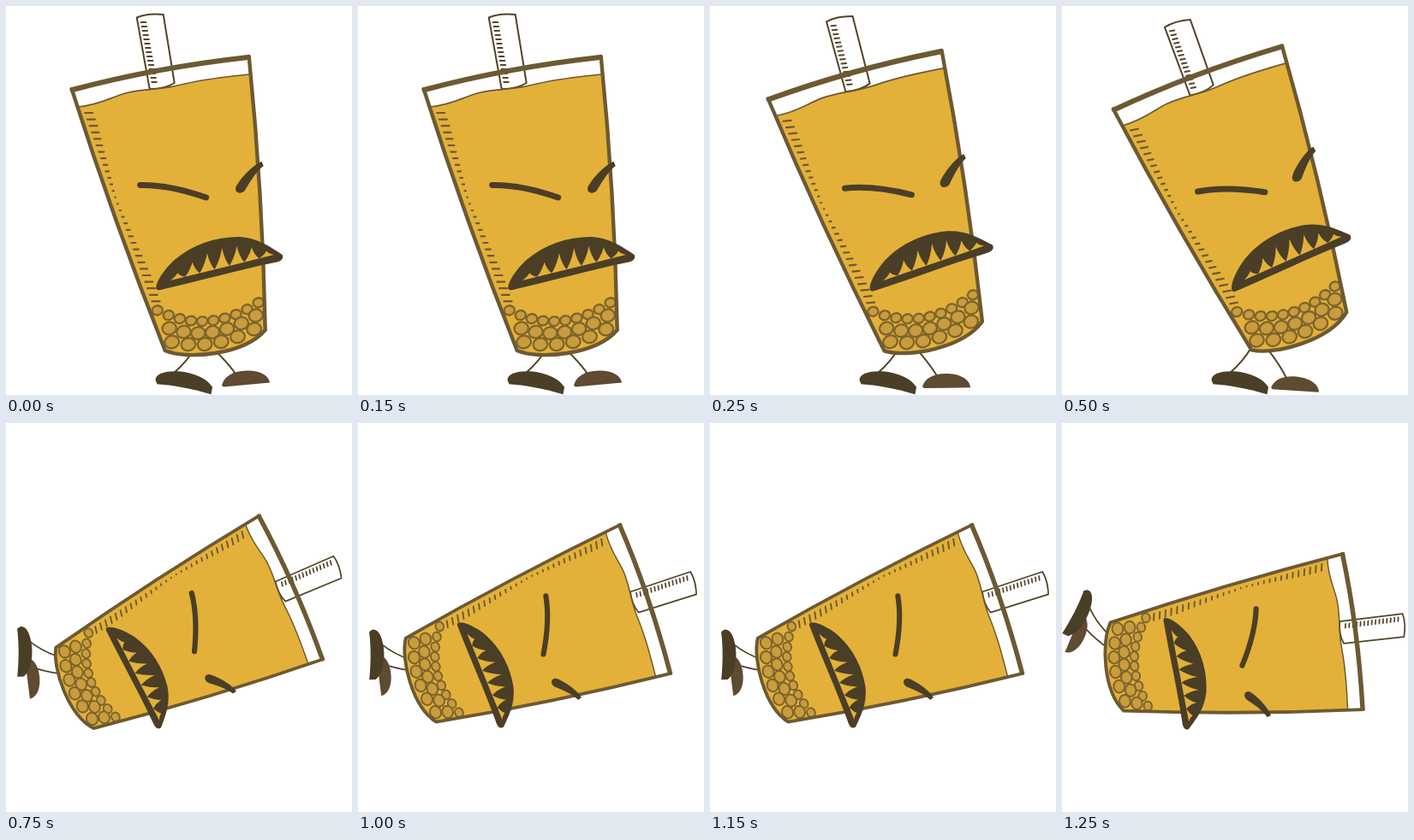
Animation, 404 px wide and 455 px high, one loop 1.5 s. Source, as an HTML page:

```html
<!DOCTYPE html>
<html lang="en">
<head>
<meta charset="utf-8">
<title>Grumpy bubble tea</title>
<style>
  html, body { margin: 0; width: 100%; height: 100%; overflow: hidden; background: #fff; }
  svg { display: block; width: 404px; height: 455px; }
  path { stroke-linecap: round; stroke-linejoin: round; }
  .line { fill: none; stroke: #6d5932; }
  .thin { fill: none; stroke: #54452a; stroke-width: 2; }
  .ink { fill: #4a3e26; }
  .tea { fill: #e3b139; }

  #cup, #near, #far, #farLeg { animation: 1500ms step-end infinite; }
  #cup { animation-name: cup; }
  #near { animation-name: near; }
  #far { animation-name: far; }
  #farLeg { animation-name: swing; }

  /* Upright half: even tilt in three steps. Lying half: held poses. */
  @keyframes cup {
    0%       { translate: 212.2px 234.2px; rotate: 0deg; scale: 1; animation-timing-function: steps(3); }
    49.9990% { translate: 220.2px 230.2px; rotate: -15.3deg; scale: 1; }
    50%      { translate: 207px 251px; rotate: 76.6deg; scale: .873; }
    66.6666% { translate: 205px 253.2px; rotate: 81.7deg; scale: .873; }
    83.3333%, 100% { translate: 202.5px 264.5px; rotate: 93.1deg; scale: .873; }
  }
  @keyframes near {
    0%       { translate: 207.5px 440.7px; rotate: 0deg; scale: 1; }
    50%      { translate: 19.5px 267px; rotate: 79deg; scale: .873; }
    66.6666% { translate: 19.5px 270.5px; }
    83.3333%, 100% { translate: 19.3px 222.3px; rotate: 106deg; scale: .873; }
  }
  @keyframes far {
    0%       { translate: 280px 436px; rotate: 0deg; scale: 1; animation-timing-function: steps(3); }
    49.9990% { translate: 269.5px 446.5px; rotate: 13.5deg; scale: 1; }
    50%      { translate: 31px 298px; rotate: 88deg; scale: .873; }
    66.6666% { translate: 30.3px 294.5px; }
    83.3333%, 100% { translate: 18.5px 248px; rotate: 118deg; scale: .873; }
  }
  @keyframes swing {
    0%        { rotate: 0deg; }
    50%, 100% { rotate: 55deg; }
  }
</style>
</head>
<body>
<svg viewBox="0 0 404 455">
  <g id="far">
    <g transform="translate(-12 -6)"><path id="farLeg" class="thin" d="M0 0 Q-11 -15 -26 -29"/></g>
    <path fill="#5f4a32" d="M-28 8 C-26 -2 -16 -9 1 -9.500 C16 -10 27 -4 28 4.500 C10 6 -8 8 -26 9.500 Z"/>
  </g>
  <g id="near">
    <path class="thin" d="M-11 -12 Q4 -25 14 -42"/>
    <path class="ink" d="M-33 -3 C-33 -11 -22 -14 -7 -13.500 C14 -12 28 -4 33.500 5 L32 13.500 C10 7 -10 3 -31 1.500 Z"/>
  </g>

  <g id="cup">
    <g transform="translate(-212.5 -234.2)">
      <clipPath id="inside"><path d="M77 97 Q126 251 186 403 C212 414 278 408 303 379 Q300 219 284 59 Z"/></clipPath>
      <g clip-path="url(#inside)">
        <path fill="#fff" d="M60 40 H310 V130 H60 Z"/>
        <path class="tea" d="M80 119 C112 115 122 107 140 102 S176 98 196 94 S222 86 290 79 L330 420 H180 Z"/>
      </g>
      <path class="thin" style="fill:#fff" d="M168 97 L153 13.500 Q166 8 184 10 L197 90 C188 96 178 97 168 97"/>
      <path id="strawTicks" class="thin"/>
      <path class="line" stroke-width="1.7" d="M85 118 C112 115 122 107 140 102 S176 98 196 94 S222 86 284 80"/>
      <path id="sideTicks" class="line" stroke-width="2.200"/>
      <g id="pearls" clip-path="url(#inside)" fill="#c99c3d" stroke="#7d642c" stroke-width="2.300"></g>

      <path class="line" stroke-width="4.400" d="M77 97 Q126 251 186 403 C212 414 278 408 303 379 Q300 219 284 59"/>
      <path class="line" stroke-width="6.200" d="M78 98 Q175 72 283 60"/>

      <path class="line" stroke-width="7" style="stroke:#4a3e26" d="M157 209.500 C181 209 211 216 234 224"/>
      <path class="ink" d="M299 182 C291 184 275 200 269 211 C266 217 273 222 279 216 C285 206 292 194 301 187 Z"/>
      <path class="ink" d="M176 331 C174 325 184 309 197 297 C218 279 245 270 272 270 C294 271 308 281 323 291
        C325 296 321 299 314 300 C270 309 225 322 181 332 Q177 333 176 331 Z"/>
      <path id="teeth" class="tea"/>
    </g>
  </g>
</svg>
<script>
  const el = id => document.getElementById(id);
  const range = n => [...Array(n).keys()];
  const setPath = (id, parts) => el(id).setAttribute('d', parts.join(' '));

  setPath('strawTicks', range(15).map(i => `M${158 + i * 0.9} ${19 + i * 5}h5.5`));

  // Ruler marks shrink to dots halfway down the cup, then grow again.
  setPath('sideTicks', range(30).map(i =>
    `M${92.5 + i * 2.7} ${125 + i * 7.6}h${Math.min(9, 0.3 + Math.abs(i - 13.5) * 0.75)}`));

  // A sagging row of pearls between two ends.
  function pearlRow(count, r, x0, y0, x1, y1, sag) {
    return range(count).map(i => {
      const t = i / (count - 1);
      const x = x0 + (x1 - x0) * t;
      const y = y0 + (y1 - y0) * t + sag * 4 * t * (1 - t);
      return `<ellipse cx="${x}" cy="${y}" rx="${r}" ry="${r * 0.88}" transform="rotate(-12 ${x} ${y})"/>`;
    }).join('');
  }
  el('pearls').innerHTML =
    pearlRow(10, 6.2, 177, 356, 295, 347, 17) +
    pearlRow(7, 8.2, 191, 377, 292, 362, 12) +
    pearlRow(6, 8.4, 194, 393, 290, 378, 9);

  // Even gaps between the fangs, tallest in the middle of the mouth.
  const pitch = 17.3;
  const at = (x, h) => `${x} ${321.5 - 0.247 * (x - 190) - h}`;
  const teeth = range(7).map(i => {
    const x = 192 + i * pitch;
    const h = 23 * Math.sin(Math.PI * (i + 0.7) / 7.4);
    return `M${at(x, 0)} Q${at(x + pitch * 0.36, h * 0.42)} ${at(x + pitch / 2, h)}` +
      ` Q${at(x + pitch * 0.64, h * 0.42)} ${at(x + pitch, 0)}Z`;
  });
  setPath('teeth', teeth);
</script>
</body>
</html>
```
